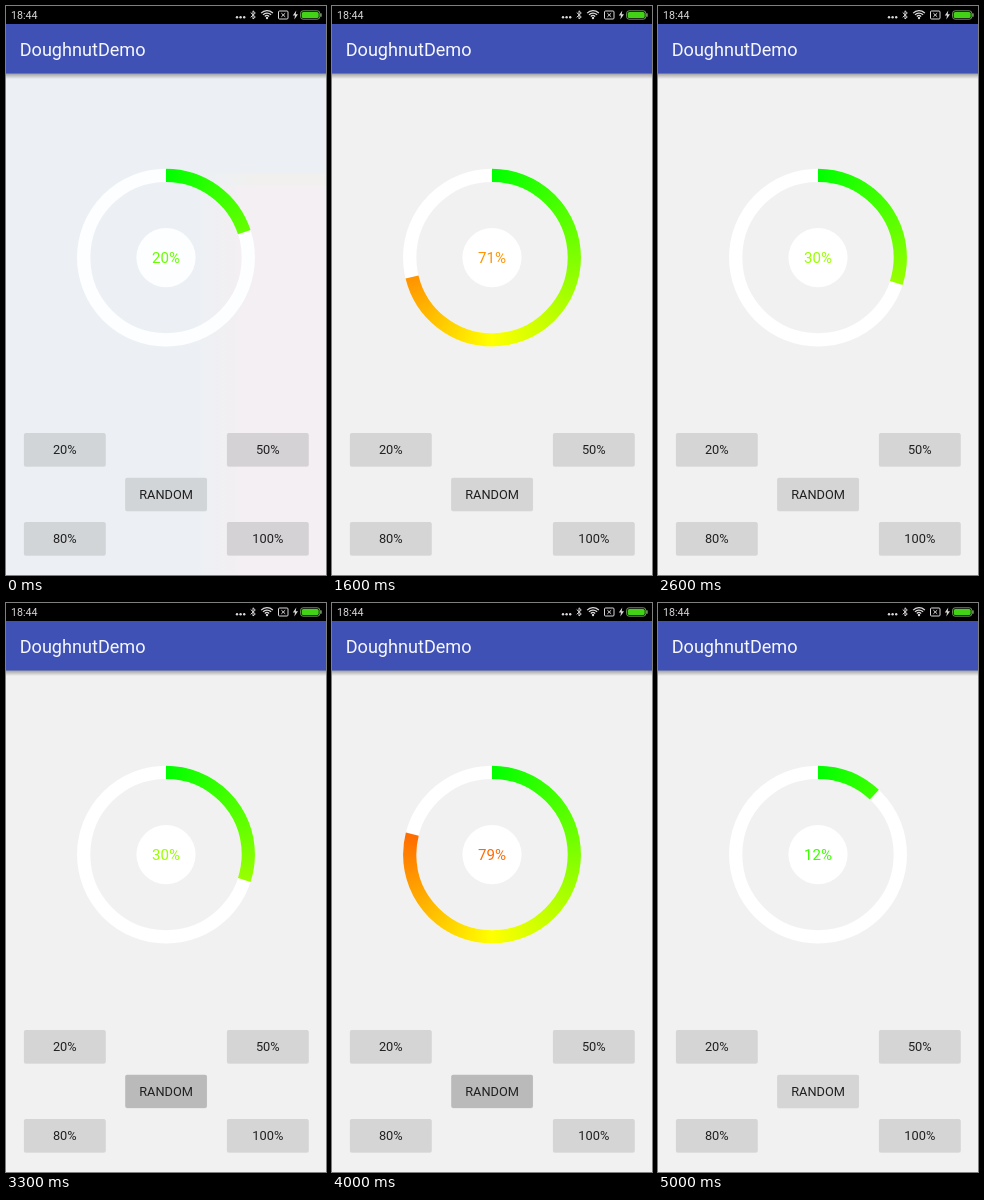
Animation of 320 by 569 pixels, one loop 5.1 s. Source, as an HTML page with a canvas:

```html
<!DOCTYPE html>
<html lang="en">
<head>
<meta charset="utf-8">
<title>Doughnut chart demo</title>
<style>
  html, body { margin: 0; width: 100%; height: 100%; overflow: hidden; background: #f1f1f1; }
  canvas { display: block; width: 320px; height: 569px; }
</style>
</head>
<body>
<canvas id="stage"></canvas>
<script>
const W = 320, H = 569, LOOP = 5100, STEP = 100;
const FONT = 'Roboto, "Noto Sans", sans-serif';
const CX = 160, CY = 251.6;
const canvas = document.getElementById('stage');
const ctx = canvas.getContext('2d');
const dpr = window.devicePixelRatio || 1;
canvas.width = Math.round(W * dpr);
canvas.height = Math.round(H * dpr);

// Each move of the ring: start, duration, from, to
const moves = [
  [1300, 400, 20, 80],
  [2200, 400, 80, 30],
  [3300, 500, 30, 79],
  [4100, 400, 79, 5],
  [4700, 300, 5, 12]
];

// Each press: button label, from, until
const presses = [
  ['80%', 1200, 1400],
  ['RANDOM', 2200, 2300],
  ['RANDOM', 3300, 3400],
  ['RANDOM', 4000, 4200],
  ['RANDOM', 4700, 4800]
];

const buttons = [
  ['20%', 18, 427], ['50%', 221, 427], ['RANDOM', 119.3, 471.7],
  ['80%', 18, 516], ['100%', 221, 516]
];

const ease = p => (1 - Math.cos(Math.PI * p)) / 2;

function valueAt(t) {
  let v = 20;
  for (const [start, span, a, b] of moves) {
    if (t >= start) v = a + (b - a) * ease(Math.min(1, (t - start) / span));
  }
  return v;
}

function colorOf(p) {
  const r = Math.min(255, Math.round(510 * p));
  const g = Math.min(255, Math.round(510 * (1 - p)));
  return `rgb(${r},${g},0)`;
}

function text(str, x, y, size, color, align = 'center') {
  ctx.font = `${size}px ${FONT}`;
  ctx.textAlign = align;
  ctx.fillStyle = color;
  ctx.fillText(str, x, y);
}

function disc(x, y, r, color) {
  ctx.fillStyle = color;
  ctx.beginPath();
  ctx.arc(x, y, r, 0, Math.PI * 2);
  ctx.fill();
}

function box(x, y, w, h, r, color) {
  ctx.fillStyle = color;
  ctx.beginPath();
  ctx.roundRect(x, y, w, h, r);
  ctx.fill();
}

function line(points, color, width) {
  ctx.strokeStyle = color;
  ctx.lineWidth = width;
  ctx.beginPath();
  points.forEach(([x, y]) => ctx.lineTo(x, y));
  ctx.stroke();
}

function linear(x0, y0, x1, y1, from, to) {
  const g = ctx.createLinearGradient(x0, y0, x1, y1);
  g.addColorStop(0, from);
  g.addColorStop(1, to);
  return g;
}

function background(tinted) {
  ctx.fillStyle = tinted ? '#ecf0f4' : '#f1f1f1';
  ctx.fillRect(0, 0, W, H);
  if (!tinted) return;
  ctx.fillStyle = linear(190, 0, 232, 0, 'rgba(243,239,242,0)', 'rgb(243,239,242)');
  ctx.fillRect(190, 179, W - 190, H - 179);
  ctx.fillStyle = linear(190, 0, 250, 0, 'rgba(241,240,239,0)', 'rgb(241,240,239)');
  ctx.fillRect(190, 168, W - 190, 11);
}

function statusBar() {
  ctx.fillStyle = '#000';
  ctx.fillRect(0, 0, W, 18);
  const ink = '#d8d8d8';
  text('18:44', 5, 13, 10.7, ink, 'left');
  for (let i = 0; i < 3; i++) disc(231 + i * 3.6, 11.3, 1.2, ink);
  line([[244.7, 6.5], [249.3, 11], [247, 13], [247, 4.8], [249.3, 7], [244.7, 11.3]], ink, 1);

  // Wi-Fi
  ctx.strokeStyle = ink;
  ctx.lineWidth = 1.3;
  for (const r of [3, 5.5, 8]) {
    ctx.beginPath();
    ctx.arc(261, 12.6, r, -Math.PI * 0.76, -Math.PI * 0.24);
    ctx.stroke();
  }
  disc(261, 12, 1.2, ink);

  // No SIM
  ctx.lineWidth = 1;
  ctx.beginPath();
  ctx.roundRect(272.5, 5, 9.5, 8, 1);
  ctx.stroke();
  line([[275.4, 7.2], [279.2, 10.8]], ink, 1);
  line([[279.2, 7.2], [275.4, 10.8]], ink, 1);

  // Charging bolt and battery
  ctx.fillStyle = ink;
  ctx.beginPath();
  [[290.3, 4.5], [286.8, 9.6], [289, 9.6], [288.3, 13.5], [292, 8.2], [289.7, 8.2]]
    .forEach(([x, y]) => ctx.lineTo(x, y));
  ctx.fill();
  ctx.strokeStyle = '#8fb87c';
  ctx.lineWidth = 0.8;
  ctx.beginPath();
  ctx.roundRect(294.6, 4.8, 19.2, 8.4, 2.5);
  ctx.stroke();
  box(295.7, 5.9, 17, 6.2, 1.6, '#42d316');
  box(314.3, 7.2, 1.3, 3.6, 0.5, '#8fb87c');
}

function toolbar() {
  ctx.fillStyle = linear(0, 67, 0, 73, 'rgba(0,0,0,0.36)', 'rgba(0,0,0,0)');
  ctx.fillRect(0, 67, W, 6);
  ctx.fillStyle = '#3f51b5';
  ctx.fillRect(0, 18, W, 49.5);
  text('DoughnutDemo', 13.7, 49.5, 18.1, '#f6f7fc', 'left');
}

function ring(v, tinted) {
  const p = v / 100, top = -Math.PI / 2, white = tinted ? '#fdfeff' : '#fff';
  ctx.lineWidth = 13.3;
  ctx.strokeStyle = white;
  ctx.beginPath();
  ctx.arc(CX, CY, 82.3, 0, Math.PI * 2);
  ctx.stroke();

  const sweep = ctx.createConicGradient(top, CX, CY);
  sweep.addColorStop(0, colorOf(0));
  sweep.addColorStop(0.5, colorOf(0.5));
  sweep.addColorStop(1, colorOf(1));
  ctx.strokeStyle = sweep;
  ctx.beginPath();
  ctx.arc(CX, CY, 82.3, top, top + p * Math.PI * 2);
  ctx.stroke();

  disc(CX, CY, 29.6, white);
  text(Math.round(v) + '%', CX, 257, 15.1, colorOf(p));
}

function button([label, x, y], t, tinted) {
  const down = presses.some(([name, a, b]) => name === label && t >= a && t < b);
  let face = down ? '#bababa' : '#d5d5d5';
  if (tinted) face = down ? '#b5b9bd' : x > 200 ? '#d5d2d5' : '#d2d5d8';
  box(x - 0.2, y + 0.4, 82, 33.5, 2, 'rgba(0,0,0,0.07)');
  box(x, y, 81.6, 33.2, 1.8, face);
  text(label, x + 40.8, y + 21.4, 12.8, '#202020');
}

function draw(t) {
  const tinted = t < 1400;
  ctx.setTransform(dpr, 0, 0, dpr, 0, 0);
  background(tinted);
  toolbar();
  statusBar();
  ring(valueAt(t), tinted);
  buttons.forEach(b => button(b, t, tinted));
}

const begin = performance.now();
function tick() {
  const t = (performance.now() - begin) % LOOP;
  draw(Math.floor(t / STEP) * STEP);
  requestAnimationFrame(tick);
}
tick();
</script>
</body>
</html>
```
